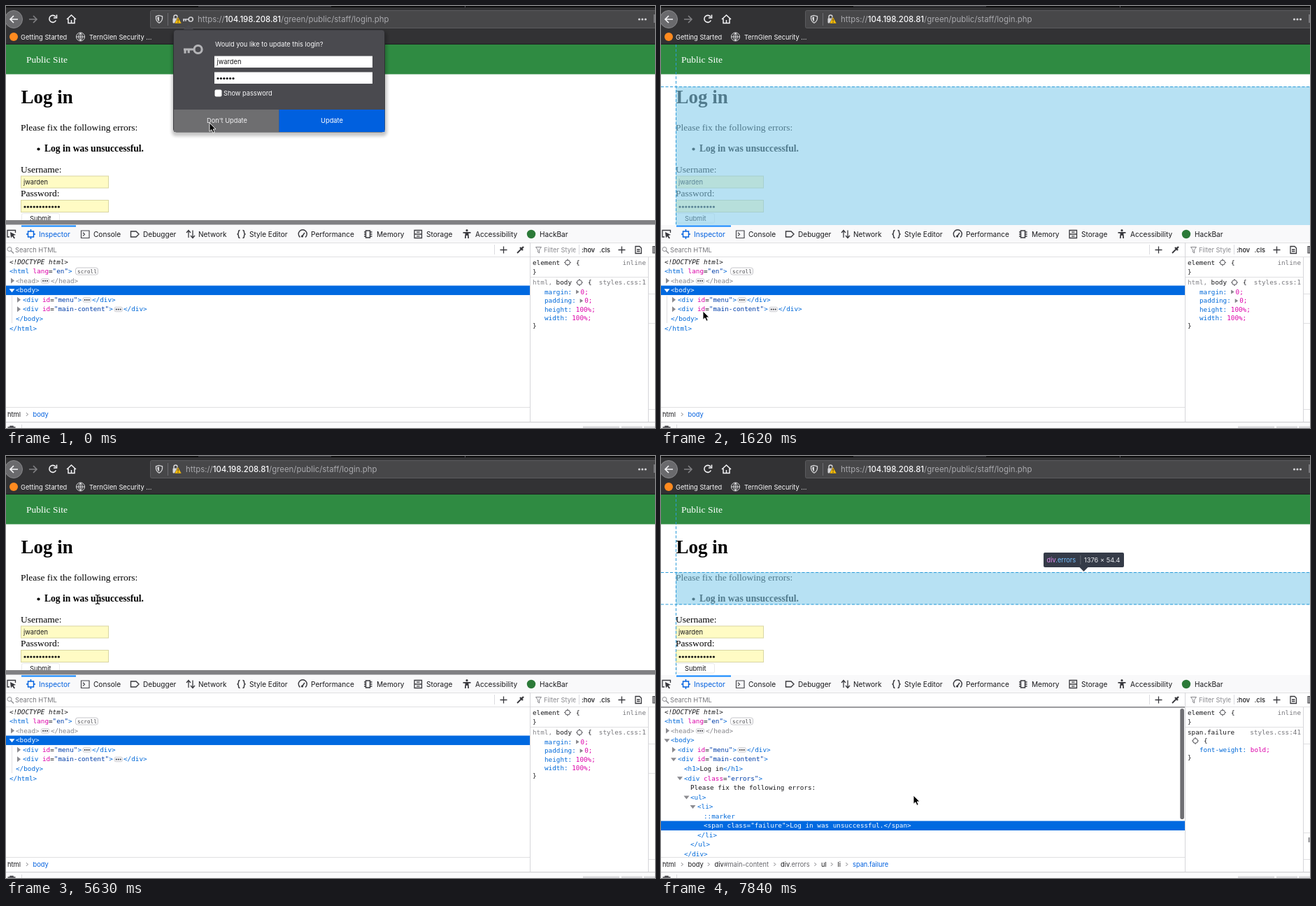
Recreate the animation shown at these times as an HTML page. Size 928 px wide and 603 px high, loop 7.99 s.

```html
<!DOCTYPE html>
<html lang="en">
<head>
<meta charset="utf-8">
<title>Inspecting a login page</title>
<style>
html, body { margin: 0; width: 100%; height: 100%; overflow: hidden; background: #fff; }
svg { display: block; width: 928px; height: 603px; }
text { white-space: pre; }
.ui { font-family: Inter, "Open Sans", sans-serif; font-size: 9.28px; }
.page { font-family: "Liberation Serif", serif; font-size: 13.5px; }
.code { font-family: "DejaVu Sans Mono", monospace; font-size: 9.31px; }
</style>
</head>
<body>
<svg id="stage" viewBox="0 0 928 603"></svg>
<script>
const LOOP = 7990;
const BLUE = '#0069d9', PINK = '#dd00a9', NAVY = '#003eaa', INK = '#18181b', GREY = '#85858a';

const esc = s => s.replace(/&/g, '&amp;').replace(/</g, '&lt;');
const box = (x, y, w, h, fill, more = '') =>
  `<rect x="${x}" y="${y}" width="${w}" height="${h}" fill="${fill}" ${more}/>`;
const dot = (x, y, r, fill) => `<circle cx="${x}" cy="${y}" r="${r}" fill="${fill}"/>`;
const fillPath = (d, fill, more = '') => `<path d="${d}" fill="${fill}" ${more}/>`;
const line = (d, color = '#45454a', w = 1.2, more = '') =>
  `<path d="${d}" fill="none" stroke="${color}" stroke-width="${w}" ${more}/>`;
const rawText = (cls, x, y, inner, fill, more = '') =>
  `<text class="${cls}" x="${x}" y="${y}" fill="${fill}" ${more}>${inner}</text>`;
const ui = (x, y, s, fill = INK, size = 9.28, more = '') =>
  rawText('ui', x, y, esc(s), fill, `style="font-size:${size}px" ${more}`);
const page = (x, y, s, fill = '#000', more = '') => rawText('page', x, y, esc(s), fill, more);
const code = (x, y, s, fill = INK, more = '') => rawText('code', x, y, esc(s), fill, more);
const group = (id, inner, more = '') => `<g id="${id}" ${more}>${inner}</g>`;
const dots = (n, x, y) =>
  Array.from({ length: n }, (_, i) => dot(x + i * 4.4, y, 1.6, '#111')).join('');

function browserBar() {
  let s = box(0, 0, 928, 55, '#323234') + box(0, 0, 928, 2, '#0c0c0d') + box(275, 0, 190, 1.3, '#38383d') +
    box(656, 0, 1, 2, '#55555a') + box(0, 54, 928, 1, '#1d1d20');
  s += box(206.5, 6.5, 730, 25, '#474749', 'rx="2" stroke="#5b5b5e"');
  s += `<circle cx="11" cy="19" r="12.5" fill="#6a6a6d" stroke="#89898c"/>` +
    line('M17 19H6M11 14L6 19L11 24', '#f4f4f6', 1.7) +
    line('M33 19H44M39 14L44 19L39 24', '#818184', 1.6) +
    line('M71 15.5A5 5 0 1 0 71.4 20.5M72.5 12.5V17H68', '#f4f4f6', 1.6) +
    line('M87 19L93.5 13L100 19M89 18V24.5H98V18M93.5 24V20', '#f4f4f6', 1.5);
  s += line('M219 13.5L223.5 14.8V18Q223 22 219 24.3Q215 22 214.5 18V14.8Z', '#d8d8da', 1.3) +
    fillPath('M219 15.3V22.3Q216.4 20.7 216.2 16.2Z', '#d8d8da') + box(231, 10, 1, 18, '#6c6c70');
  s += box(238.5, 17.5, 8, 7, '#d8d8da', 'rx="1"') + line('M240 18V15.5A2.5 2.5 0 0 1 245 15.5V18', '#d8d8da', 1.4) +
    fillPath('M246 15.5L251 25H241Z', '#ffbf00', 'stroke="#474749" stroke-width=".6"') + box(245.5, 18.5, 1.1, 3.2, '#333') + dot(246, 23.2, .7, '#333');
  s += group('keyIcon', key(253, 19, .56, '#d0d0d3'));
  s += `<text id="url" class="ui" y="23" fill="#a9a9ad" style="font-size:11.42px">https://<tspan fill="#fafafc" font-weight="500">104.198.208.81</tspan>/green/public/staff/login.php</text>`;
  s += [905.5, 910, 914.5].map(x => dot(x, 19, 1.6, '#d0d0d3')).join('') + box(926, 12, 2, 12, '#77777b');
  s += dot(11, 44, 6, '#ff8a1f') + ui(21, 47.7, 'Getting Started', '#f9f9fa') + ui(119, 47.7, 'TernGlen Security ...', '#f9f9fa');
  s += line('M100.5 44a6 6 0 1 0 12 0a6 6 0 1 0 -12 0H112.5M106.5 38V50M106.5 38Q101 44 106.5 50Q112 44 106.5 38', '#d8d8da', 1);
  return s;
}

function key(x, y, k, color) {
  return `<g transform="translate(${x} ${y}) scale(${k})">` +
    line('M0 0H15M2 0V5.5M7 0V5', color, 3) +
    `<circle cx="20" cy="0" r="5.4" fill="none" stroke="${color}" stroke-width="3"/></g>`;
}

function loginPage() {
  const field = y => box(21.5, y, 125, 17, '#fffbc4', 'stroke="#d9d6a3"');
  return box(0, 55, 928, 258, '#fff') + box(0, 55, 928, 42.5, '#2f8b42') +
    page(29, 81, 'Public Site', '#fff') +
    page(21.5, 138.5, 'Log in', '#000', 'style="font-size:27px;font-weight:bold"') +
    page(21, 178, 'Please fix the following errors:') +
    dot(46.5, 204.5, 2.1, '#000') + page(55, 208, 'Log in was unsuccessful.', '#000', 'font-weight="bold" style="font-size:13.6px"') +
    page(21, 238, 'Username:') + field(243) + ui(25, 255.3, 'jwarden') +
    page(21, 272, 'Password:') + field(277.5) + dots(12, 27, 287) +
    box(22.5, 296.5, 54, 13.5, '#fff', 'rx="2" stroke="#e9e9e9"') + ui(34, 306.6, 'Submit');
}

function popup() {
  return box(237, 36, 308, 150, '#000', 'rx="6" opacity=".22" filter="url(#soft)"') +
    fillPath('M253 34.5L261 26.5L269 34.5Z', '#4a4a4f') +
    box(239.5, 34, 302, 146, '#4a4a4f', 'rx="4" stroke="#2a2a2e" stroke-width=".8"') +
    key(254, 62, 1.03, '#b4b4b7') +
    ui(299, 57.8, 'Would you like to update this login?', '#f9f9fa') +
    box(298, 71.5, 226, 16.5, '#fff') + ui(301.5, 83.2, 'jwarden') +
    box(298, 94.5, 226, 16.5, '#fff') + dots(6, 303, 103.5) +
    box(298.5, 119.5, 10, 10, '#fff', 'rx="2"') + ui(311, 128, 'Show password', '#f9f9fa') +
    box(240, 148, 150.5, 32, '#6e6e70') + box(390.5, 148, 151, 32, '#0060df') +
    ui(316, 167.2, "Don't Update", '#f0f0f2', 9.28, 'text-anchor="middle"') +
    ui(466, 167.2, 'Update', '#fff', 9.28, 'text-anchor="middle"');
}

function toolTabs() {
  const tabs = [[47, 'Inspector'], [125, 'Console'], [196, 'Debugger'], [275, 'Network'], [348, 'Style Editor'],
    [436, 'Performance'], [530, 'Memory'], [601, 'Storage'], [671, 'Accessibility'], [763, 'HackBar']];
  let s = box(0, 313, 928, 290, '#fff') + box(0, 313, 928, 25, '#f9f9fa') + box(0, 338, 928, 1, '#e0e0e2') +
    box(22, 313.5, 78, 2, '#0a84ff');
  s += tabs.map(([x, label], i) => ui(x, 329.6, label, i ? INK : '#0060df', 10.1)).join('');
  s += line('M5 330H2V320.5H13.5V324', '#38383d', 1.3) + fillPath('M6 323L14 327L10.5 328L13 331.5L11.5 332.5L9 329L7 331.5Z', '#38383d');
  s += line('M31.5 322H39.5V330H31.5ZM35.5 319V322M35.5 330V333M29 326H31.5M39.5 326H42', '#0060df', 1.4);
  s += line('M107.5 321H119V331.5H107.5ZM110 323.8L112.5 326.2L110 328.6') + line('M178.5 322H186L190 326L186 330H178.5Z', '#38383d', 1.4) +
    line('M261 331V321M258 324L261 320.5L264 324M267 320.5V331M264 328L267 331.5L270 328', '#38383d', 1.3) +
    line('M334.5 320.5Q332.5 320.5 332.5 323Q332.5 326 330.5 326Q332.5 326 332.5 329Q332.5 331.5 334.5 331.5M338.5 320.5Q340.5 320.5 340.5 323Q340.5 326 342.5 326Q340.5 326 340.5 329Q340.5 331.5 338.5 331.5', '#38383d', 1.4) +
    line('M420.5 330.5A6 6 0 1 1 428 330.5M423 330L427 324', '#38383d', 1.4) + dot(423.5, 329, 1.6, '#38383d') +
    line('M514.5 321H520.5V331H514.5ZM512 323H514M512 326H514M512 329H514M521 323H523.5M521 326H523.5M521 329H523.5', '#38383d', 1.4) +
    line('M584 320.5H594.5V331.5H584ZM584 326H594.5M587 323.2H591.5M587 328.8H591.5', '#38383d', 1.3) +
    dot(659, 320.7, 1.6, '#38383d') + line('M653.5 323.8H664.5M659 324V328M657.5 324.5L656.8 332M660.5 324.5L661.2 332', '#38383d', 1.7) +
    dot(751, 326, 6.2, '#2c7a38');
  s += `<circle cx="5" cy="347.5" r="3" fill="none" stroke="#8a8a8f"/>` + line('M7.2 349.8L11 353.5', GREY, 1.2) + ui(13, 351.8, 'Search HTML', '#77777c') +
    box(698, 341, 1, 14, '#dcdce0') + line('M711.5 343.5V353.5M706.5 348.5H716.5', '#38383d', 1.3) +
    line('M731 353L737 347', '#38383d', 1.8) + line('M735 345L739 349M737 347L740 344', '#38383d', 2.4) +
    box(0, 358, 928, 1, '#e0e0e2');
  s += line('M757.5 344.5H765.5L762.5 348.5V353L760.5 351.5V348.5Z', GREY, 1) + ui(769, 351.8, 'Filter Styles', '#88888d') +
    box(814.5, 341, 8, 15, '#fff') + box(819, 341, 1, 14, '#dcdce0') +
    ui(823, 351.8, ':hov', INK, 9.28, 'font-weight="500"') + ui(848.5, 351.8, '.cls', INK, 9.28, 'font-weight="500"') +
    line('M880.5 343.5V353.5M875.5 348.5H885.5', '#38383d', 1.3) +
    line('M900 343.5H906L908.5 346V353.5H900ZM902 348H906.5M902 350.5H906.5', '#38383d', 1.3) + line('M928 343.5H925V353H928M927 344V353', '#45454a');
  return s;
}

const rowY = i => 368.7 + i * 13.55;
const span = (fill, s) => `<tspan fill="${fill}">${esc(s)}</tspan>`;
const tag = (name, attr, value) => span(BLUE, '<' + name) +
  (attr ? span(PINK, ' ' + attr) + span(INK, '=') + span(NAVY, `"${value}"`) : '') + span(BLUE, '>');
const end = name => span(BLUE, `</${name}>`);
const row = (i, x, inner, fill = INK) => rawText('code', x, rowY(i), inner, fill);
const arrow = (i, x, open, fill = '#8b8b90') => {
  const y = rowY(i) - 3.2;
  return fillPath(open ? `M${x - 4} ${y - 2}h8l-4 5z` : `M${x - 2} ${y - 4}v8l5 -4z`, fill);
};
const badge = (i, x) => box(x, rowY(i) - 6.3, 11.5, 6.6, '#f1f1f3', 'rx="2" stroke="#c4c4c9" stroke-width=".7"') +
  [2.8, 5.75, 8.7].map(d => dot(x + d, rowY(i) - 3, 1, '#38383d')).join('');
const selected = (i, x, s) => box(0, rowY(i) - 9.8, 749, 13.5, '#0069e0') + row(i, x, esc(s), '#fff');

function treeHead() {
  return rawText('code', 5, rowY(0), esc('<!DOCTYPE html>'), INK, 'font-style="italic"') +
    row(1, 5, tag('html', 'lang', 'en')) +
    box(99.5, 374, 32, 10, '#fff', 'rx="3" stroke="#b8b8bd" stroke-width=".8"') + code(102, 381.8, 'scroll', '#4a4a4f', 'style="font-size:7.7px"') +
    arrow(2, 9, false) + row(2, 14, esc('<head>'), GREY) + badge(2, 50.3) + row(2, 64, esc('</head>'), GREY) +
    arrow(4, 18, false) + row(4, 24, tag('div', 'id', 'menu')) + badge(4, 110) + row(4, 123, end('div'));
}

function treeClosed() {
  return selected(3, 14, '<body>') + arrow(3, 8.5, true, '#fff') + box(8, 414, 1, 39, '#e0e0e2') +
    arrow(5, 18, false) + row(5, 24, tag('div', 'id', 'main-content')) + badge(5, 155) + row(5, 168, end('div')) +
    row(6, 14, end('body')) + row(7, 5, end('html'));
}

function treeOpen() {
  return box(0, 358.5, 749, 1, '#4a4a4f') + arrow(3, 8.5, true) + row(3, 14, tag('body')) +
    arrow(5, 18, true) + row(5, 24, tag('div', 'id', 'main-content')) +
    row(6, 33, tag('h1') + 'Log in' + end('h1')) +
    arrow(7, 27, true) + row(7, 33, tag('div', 'class', 'errors')) +
    row(8, 42, 'Please fix the following errors:') +
    arrow(9, 36.5, true) + row(9, 42, tag('ul')) +
    arrow(10, 45.5, true) + row(10, 52, tag('li')) +
    row(11, 61, '::marker', BLUE) +
    selected(12, 61, '<span class="failure">Log in was unsuccessful.</span>') +
    row(13, 52, end('li')) + row(14, 42, end('ul')) + row(15, 33, end('div')) +
    box(742.3, 361, 5.7, 158, '#6f6f73', 'rx="2.8"');
}

function gear(x, y) {
  return `<circle cx="${x}" cy="${y}" r="3.3" fill="none" stroke="#66666b" stroke-width="1.1"/>` +
    line(`M${x} ${y - 5}v2M${x} ${y + 3}v2M${x - 5} ${y}h2M${x + 3} ${y}h2`, '#66666b', 1.2);
}
const right = (y, s) => code(915, y, s, '#77777c', 'text-anchor="end"');
const rule = (y, name, value) => code(770, y, name + ':', BLUE) + code(770 + (name.length + 2) * 5.6, y, value, PINK);
const small = (y, name) => code(770, y, name + ':', BLUE) +
  fillPath(`M${776 + name.length * 5.6 + 5.5} ${y - 6}v6l4.5 -3z`, GREY) + code(788 + name.length * 5.6, y, '0;', PINK);

function rulesHead() {
  return code(753, 369.5, 'element') + gear(803, 366.5) + code(815, 369.5, '{') + right(369.5, 'inline') +
    code(753, 382.5, '}') + box(750, 387, 168, 1, '#e0e0e2');
}
function rulesBody() {
  return rawText('code', 753, 398.2, span(GREY, 'html, ') + 'body', INK) + gear(820, 395) + code(832, 398.2, '{') +
    right(398.2, 'styles.css:1') + small(411.6, 'margin') + small(424.2, 'padding') +
    rule(436.6, 'height', '100%;') + rule(448.8, 'width', '100%;') + code(753, 460, '}') +
    box(919, 453, 9, 1, '#e0e0e2');
}
function rulesSpan() {
  return code(753, 398.2, 'span.failure') + right(398.2, 'styles.css:41') + gear(764, 407) + code(776, 410.2, '{') +
    rule(422.8, 'font-weight', 'bold;') + code(753, 434.2, '}') + box(919, 538, 9, 1, '#e0e0e2') + box(926, 545, 1.2, 7, '#55555a');
}

function footer() {
  return box(0, 573, 749, 30, '#fff') + box(0, 573, 749, 1, '#e0e0e2') + box(0, 594, 928, 1.5, '#d2d2d5') +
    box(0, 595.5, 928, 8, '#fbfbfc') + box(22, 598, 1, 5, '#dcdce0') + line('M2.5 602H13.5M6 602V600.5H10V602', '#45454a', 1.5) +
    box(825, 600.5, 52, 3, '#d9d9dc') + box(880, 600.5, 30, 3, '#d9d9dc') + box(912, 600.5, 16, 3, '#d9d9dc') +
    box(749, 338, 1, 256, '#d6d6da') + box(918, 359, 1, 235, '#d6d6da') + box(919, 411, 9, 1, '#e0e0e2') + box(919, 576, 9, 1, '#e0e0e2');
}
function crumbs(list) {
  return list.map(([x, name, rest = ''], i) => {
    const last = i === list.length - 1;
    return rawText('ui', x, 587, name + (rest && span(last ? '#0060df' : '#66666b', rest)), last ? '#0060df' : INK) +
      (i ? line(`M${x - 9.5} 581.2l2.3 2.3l-2.3 2.3`, '#66666b', .9) : '');
  }).join('');
}

// Highlighted box, its dashed guides and an optional label
function highlight(id, x, y, w, h, tip) {
  let s = box(x, y, w, h, '#87ceeb', 'opacity=".6"');
  const guide = d => line(d, '#2b9bd8', 1, 'stroke-dasharray="4 2.5"');
  s += guide(`M0 ${y + .5}H928M0 ${y + h - .5}H928`);
  if (x > 0) s += guide(`M${x + .5} 55V312`);
  if (x + w < 928) s += guide(`M${x + w + .5} 55V312`);
  if (tip) {
    const { left, top, width, name, rest, color, size, split, up } = tip;
    const mid = left + width / 2;
    s += box(left, top, width, 21, '#353b48', 'rx="2"') +
      fillPath(up ? `M${mid - 6} ${top}l6 -6l6 6z` : `M${mid - 6} ${top + 21}l6 6l6 -6z`, '#353b48') +
      rawText('ui', left + 4.5, top + 13.8, span('#e08bee', name) + span(color, rest), color) +
      box(split, top + 4, .8, 13, '#6a707c') + ui(split + 5.5, top + 13.8, size, '#e6e8ec');
  }
  return group(id, s, 'clip-path="url(#view)"');
}

const pointer = group('pointer', fillPath('M0 0V12.3L2.9 9.7L5 14.3L7.2 13.3L5.2 8.9H9Z', '#000', 'stroke="#fff" stroke-width=".9"'));
const beamPath = 'M-3.2 -6.5Q0 -6.5 0 -4.5Q0 -6.5 3.2 -6.5M0 -5V5M-3.2 6.5Q0 6.5 0 4.5Q0 6.5 3.2 6.5M-1.8 1.8H1.8';
const beam = group('beam', line(beamPath, '#fff', 2.4, 'opacity=".7"') + line(beamPath, '#000', 1.2));

const stage = document.getElementById('stage');
stage.innerHTML =
  '<defs><clipPath id="view"><rect x="0" y="55" width="928" height="258"/></clipPath>' +
  '<filter id="soft"><feGaussianBlur stdDeviation="2"/></filter></defs>' +
  loginPage() +
  highlight('hlMenu', 0, 55, 928, 42.5, { left: 551, top: 107, width: 109, name: 'div', rest: '#menu', color: '#86de74', size: '1442 × 50', split: 604.5, up: true }) +
  highlight('hlMain', 21, 115, 940, 220) +
  highlight('hlSpan', 55, 197, 141, 14, { left: 63, top: 169, width: 126, name: 'span', rest: '.failure', color: '#75bfff', size: '167.183 × 16', split: 124 }) +
  highlight('hlErrors', 21, 166, 1161, 46.5, { left: 547, top: 138, width: 115, name: 'div', rest: '.errors', color: '#75bfff', size: '1376 × 54.4', split: 599.5 }) +
  group('bar', box(0, 306, 928, 6.5, '#808083')) +
  browserBar() + toolTabs() + treeHead() + rulesHead() +
  group('closed', treeClosed() + rulesBody()) + group('open', treeOpen() + rulesSpan()) +
  footer() +
  group('crumbsShort', crumbs([[2, 'html'], [38.5, 'body']])) +
  group('crumbsLong', crumbs([[2, 'html'], [38.5, 'body'], [76.5, 'div', '#main-content'], [171, 'div', '.errors'], [229, 'ul'], [252.5, 'li'], [274, 'span', '.failure']])) +
  group('popup', popup()) + pointer + beam;

// Pointer moves: first step, last step, number of steps, end point
const start = [291, 167];
const moves = [
  [140, 1180, 8, 2, 414], [1330, 1620, 3, 60, 436], [2220, 2520, 3, 92, 413],
  [3110, 3400, 3, 116, 243], [3550, 3990, 4, 119, 248], [4580, 5180, 5, 131, 205],
  [6070, 6810, 6, 213, 399], [7690, 7840, 2, 361, 485]
];
// When each part is on show
const shown = {
  popup: [[0, 290]], keyIcon: [[0, 290]], bar: [[0, 290], [5630, 7100]],
  hlMenu: [[1180, 1330], [2520, 3110]], hlMain: [[1330, 2520]],
  hlSpan: [[7250, 7840]], hlErrors: [[7840, LOOP]],
  closed: [[0, 6950]], crumbsShort: [[0, 6950]], open: [[6950, LOOP]], crumbsLong: [[6950, LOOP]]
};
const part = id => document.getElementById(id);
const ease = p => p * p * (3 - 2 * p);

function pointerAt(t) {
  let [x, y] = start;
  for (const [from, to, n, endX, endY] of moves) {
    if (t < from) break;
    const gap = (to - from) / (n - 1);
    const step = t >= to ? n : Math.min(n - 1, Math.floor((t - from) / gap) + 1);
    const p = ease(step / n);
    x += (endX - x) * p;
    y += (endY - y) * p;
  }
  return [x, y];
}

function draw(t) {
  for (const id in shown)
    part(id).style.display = shown[id].some(([a, b]) => t >= a && t < b) ? '' : 'none';
  part('url').setAttribute('x', t < 290 ? 274 : 257);
  const [x, y] = pointerAt(t);
  const overText = y > 187 && y < 306 && t > 3000;
  part('pointer').style.display = overText ? 'none' : '';
  part('beam').style.display = overText ? '' : 'none';
  for (const id of ['pointer', 'beam']) part(id).setAttribute('transform', `translate(${x} ${y})`);
}

const begin = performance.now();
function tick() {
  draw((performance.now() - begin) % LOOP);
  requestAnimationFrame(tick);
}
draw(0);
requestAnimationFrame(tick);
</script>
</body>
</html>
```
